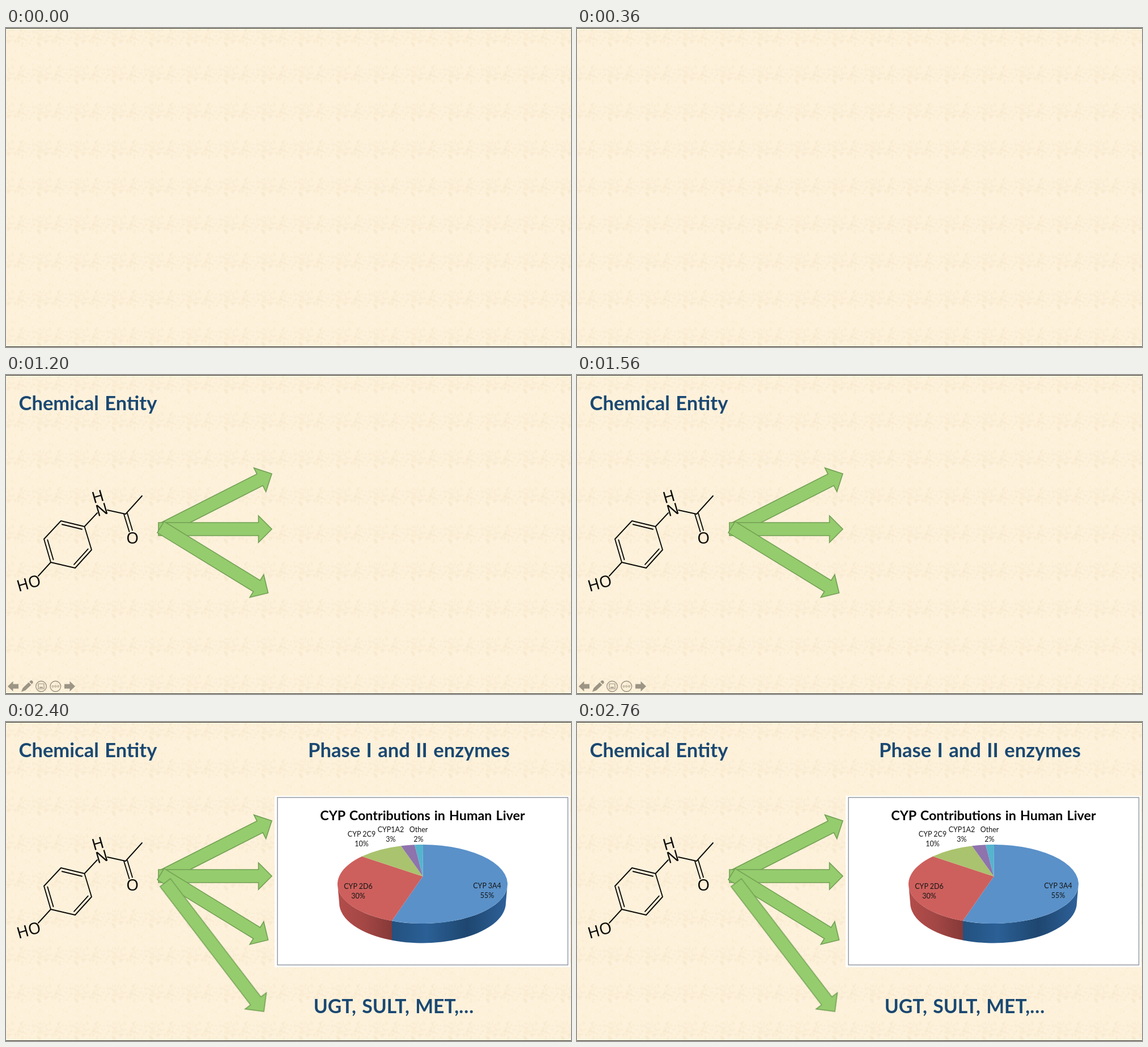
Animation of 997 by 562 pixels, one loop 3000 ms. Source, as an HTML page with a canvas:

```html
<!DOCTYPE html>
<html lang="en">
<head>
<meta charset="utf-8">
<title>Chemical entity and enzymes</title>
<style>
html, body { margin: 0; width: 100%; height: 100%; overflow: hidden; background: #fdf1da; }
canvas, svg { position: absolute; left: 0; top: 0; width: 997px; height: 562px; display: block; }
text { text-anchor: middle; font-family: Lato, sans-serif; }
.head { font-weight: 700; font-size: 34.6px; word-spacing: 2px; fill: #1a4872; }
.title { font-weight: 700; font-size: 23.3px; word-spacing: 1.5px; fill: #050505; }
.label { font-size: 12.5px; fill: #151515; }
.atom text { font-family: "Noto Sans", sans-serif; font-size: 28px; fill: #0c0b09; }
.bonds { fill: none; stroke: #0c0b09; stroke-width: 1.9; stroke-linecap: round; stroke-linejoin: round; }
.arrow { fill: #95cc6d; stroke: #72a054; stroke-width: 1.6; }
.step1, .step2, .step3, .step4, .tools { animation: step1 3s step-end infinite; }
.step2 { animation-name: step2; }
.step3 { animation-name: step3; }
.step4 { animation-name: step4; }
.tools { animation-name: tools; }
@keyframes step1 { 0% { opacity: 0 } 20%, 100% { opacity: 1 } }
@keyframes step2 { 0% { opacity: 0 } 40%, 100% { opacity: 1 } }
@keyframes step3 { 0% { opacity: 0 } 60%, 100% { opacity: 1 } }
@keyframes step4 { 0% { opacity: 0 } 80%, 100% { opacity: 1 } }
@keyframes tools { 0% { opacity: 0 } 40% { opacity: 1 } 60%, 100% { opacity: 0 } }
</style>
</head>
<body>
<canvas id="paper" width="997" height="562"></canvas>
<svg viewBox="0 0 997 562">
  <defs>
    <linearGradient id="blueSide">
      <stop offset="0" stop-color="#23517f"/>
      <stop offset=".3" stop-color="#2b6096"/>
      <stop offset=".65" stop-color="#1e466f"/>
      <stop offset="1" stop-color="#2e619a"/>
    </linearGradient>
    <linearGradient id="redSide">
      <stop offset="0" stop-color="#b34d4b"/>
      <stop offset=".5" stop-color="#a34745"/>
      <stop offset="1" stop-color="#863938"/>
    </linearGradient>
  </defs>

  <path d="M0 .5H997M0 561.5H997" stroke="#33312d"/>

  <g class="step1">
    <text class="head" x="144.5" y="62">Chemical Entity</text>
    <path class="bonds" id="bonds"/>
    <g class="atom">
      <text transform="translate(162 214) rotate(-16)" y="10">H</text>
      <text transform="translate(169 237) rotate(-16)" y="10">N</text>
      <text transform="translate(223.3 287)" y="10">O</text>
      <text transform="translate(40 366.5) rotate(-16)" y="10">HO</text>
    </g>
  </g>

  <g class="step2" id="arrows"></g>
  <g class="step4" id="lastArrow"></g>

  <g class="tools" fill="#9c9484">
    <path id="back" d="M3 548.5L12.500 539.500V544.500H22V552.500H12.500V557.500Z"/>
    <use href="#back" transform="matrix(-1 0 0 1 125 0)"/>
    <path d="M27 558L29.500 551.500L40 541.500L44.500 546L34 555.800ZM41.200 540.400L43.500 538.300Q45 537.300 46.800 539Q48.600 541 47.500 542.500L45.500 544.800Z"/>
    <g fill="none" stroke="#9c9484" stroke-width="1.4">
      <circle cx="62" cy="548.500" r="9.300"/>
      <circle cx="87.300" cy="548.500" r="9.300"/>
      <path d="M57 544H67V553H57Z" stroke-width="1.200"/>
      <path d="M59 550.500H65" stroke-width="2"/>
      <g stroke-width="1">
        <circle cx="82.600" cy="548.500" r="1.500"/>
        <circle cx="87.300" cy="548.500" r="1.500"/>
        <circle cx="92" cy="548.500" r="1.500"/>
      </g>
    </g>
  </g>

  <g class="step3">
    <text class="head" x="711" y="62">Phase I and II enzymes</text>
    <path d="M474 130H995V432H474Z" fill="#fff"/>
    <path d="M479 133H991.500V428H479Z" fill="#fff" stroke="#959ba3" stroke-width="1.500"/>
    <text class="title" x="735" y="172.500">CYP Contributions in Human Liver</text>
    <g id="pie"></g>
  </g>

  <text class="head step4" x="684" y="513" style="font-size:33.700px">UGT, SULT, MET,…</text>
</svg>
<script>
const $ = id => document.getElementById(id);

// Paper: one small seamless tile of soft specks, repeated.
function paintPaper() {
  const size = 66, tile = document.createElement('canvas');
  tile.width = tile.height = size;
  const c = tile.getContext('2d');
  let seed = 7;
  const rnd = () => (seed = seed * 16807 % 2147483647) / 2147483647;
  c.fillStyle = '#fdf1da';
  c.fillRect(0, 0, size, size);
  const speck = (color, x, y, rx, ry, turn) => {
    c.fillStyle = color;
    for (const dx of [-size, 0, size]) for (const dy of [-size, 0, size]) {
      c.beginPath();
      c.ellipse(x + dx, y + dy, rx, ry, turn, 0, Math.PI * 2);
      c.fill();
    }
  };
  for (let i = 0; i < 45; i++)
    speck('rgba(246,230,200,.3)', rnd() * size, 14 + (rnd() + rnd() - 1) * 18, 1 + rnd() * 4, 1 + rnd() * 2, rnd() * 3);
  for (let i = 0; i < 170; i++)
    speck(i % 3 ? 'rgba(255,246,231,.5)' : 'rgba(248,234,202,.4)', rnd() * size, rnd() * size, .6 + rnd() * 2.4, .5 + rnd(), rnd() * 3);
  const page = $('paper').getContext('2d');
  page.fillStyle = page.createPattern(tile, 'repeat');
  page.fillRect(0, 0, 997, 562);
}

function drawBonds() {
  const ring = [[97, 257], [138.5, 267], [151, 308], [122, 340], [79, 330], [67, 289]];
  const inner = ([x, y]) => [109 + (x - 109) * .85, 298.5 + (y - 298.5) * .85];
  const line = (a, b) => `M${a}L${b}`;
  let d = `M${ring.join('L')}Z`;
  for (const i of [0, 2, 4]) d += line(inner(ring[i]), inner(ring[i + 1]));
  d += line([138.5, 267], [161, 243]) + line([179, 238], [211, 245]) + line([211, 245], [240, 213]);
  d += line([208, 245], [217.5, 276]) + line([214, 243.5], [223, 273.5]) + line([79, 330], [57, 354]);
  $('bonds').setAttribute('d', d);
}

function arrow(x, y, tipX, tipY) {
  const len = Math.hypot(tipX - x, tipY - y), neck = len - 23.5;
  const angle = Math.atan2(tipY - y, tipX - x) * 180 / Math.PI;
  return `<path class="arrow" transform="translate(${x} ${y}) rotate(${angle})"
    d="M0 -11.5H${neck}V-23.5L${len} 0L${neck} 23.5V11.5H0Z"/>`;
}

function drawPie() {
  const cx = 735, top = { y: 285.5, rx: 150, ry: 69.5 }, base = { y: 318.5, rx: 147, ry: 71 };
  const at = (e, x, side) => [x, e.y + side * e.ry * Math.sqrt(1 - ((x - cx) / e.rx) ** 2)];
  const arc = (e, p, sweep = 1, large = 0) => `A${e.rx} ${e.ry} 0 ${large} ${sweep} ${p}`;
  const wall = (from, to, fill) => {
    const inside = x => cx + Math.max(-base.rx, Math.min(base.rx, x - cx));
    return `<path fill="url(#${fill})" d="M${at(top, from, 1)}${arc(top, at(top, to, 1))}
      L${at(base, inside(to), 1)}${arc(base, at(base, inside(from), 1), 0)}Z"/>`;
  };
  const slice = (a, b, fill, large) =>
    `<path fill="${fill}" d="M735.5 272L${a}${arc(top, b, 1, large)}Z"/>`;
  const cut = [at(top, 736, -1), at(top, 681, 1), at(top, 628, -1), at(top, 697, -1), at(top, 721, -1)];
  const colors = ['#5a91c9', '#cd605d', '#aac36e', '#8e73ad', '#55b4ce'];
  const labels = [
    ['CYP 3A4', '55%', 849, 293], ['CYP 2D6', '30%', 621.5, 294],
    ['CYP 2C9', '10%', 627.5, 202], ['CYP1A2', '3%', 679, 193.5], ['Other', '2%', 728, 193.5]
  ];
  const text = (s, x, y) => `<text class="label" x="${x}" y="${y}">${s}</text>`;
  $('pie').innerHTML = wall(885, 681, 'blueSide') + wall(681, 585, 'redSide') +
    colors.map((c, i) => slice(cut[i], cut[(i + 1) % 5], c, i ? 0 : 1)).join('') +
    labels.map(([name, share, x, y]) => text(name, x, y) + text(share, x, y + 17.3)).join('');
}

paintPaper();
drawBonds();
$('arrows').innerHTML = arrow(275, 272.3, 469, 174) + arrow(269, 271.5, 469, 271.5) + arrow(273, 268, 462.5, 384);
$('lastArrow').innerHTML = arrow(281, 283, 455, 510);
drawPie();
</script>
</body>
</html>
```
